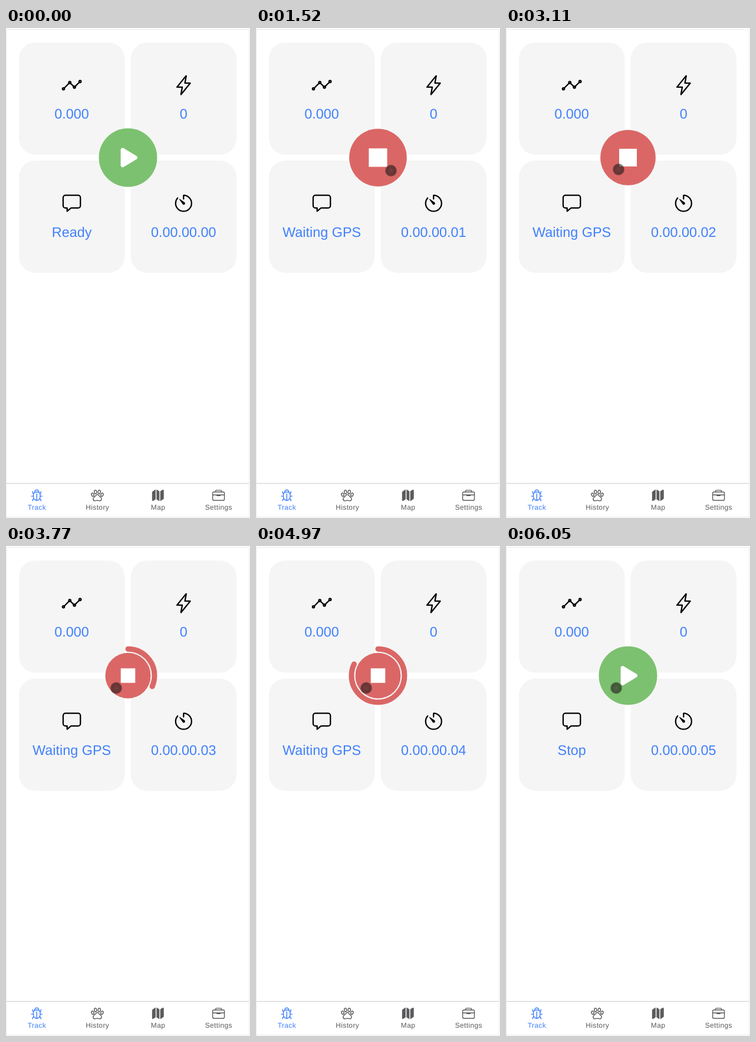
An HTML page that plays this animation: 414x828 px, repeating every 6080 ms.

```html
<!DOCTYPE html>
<html lang="en">
<head>
<meta charset="utf-8">
<title>Tracker</title>
<style>
  html, body { margin: 0; height: 100%; overflow: hidden; background: #fff; }
  svg { display: block; width: 414px; height: 828px; font-family: "Liberation Sans", Arial, sans-serif; text-anchor: middle; }
  text { text-rendering: geometricPrecision; }
  .card { fill: #f5f5f5; }
  .value { font-size: 23.4px; fill: #4080fc; }
  .line { fill: none; stroke: currentColor; stroke-width: 32; stroke-linecap: round; stroke-linejoin: round; }
  .solid { fill: currentColor; stroke: none; }
  .tab { font-size: 12px; letter-spacing: .36px; fill: currentColor; }
</style>
</head>
<body>
<svg viewBox="0 0 414 828">
  <path d="M.5 828V2.5H412.5V828M0 826.5H413" fill="none" stroke="#ece8ee"/>
  <g id="cards"></g>
  <path d="M1 769.5H412" stroke="#cdcdcd"/>
  <g id="tabs"></g>
  <g transform="translate(207 219)">
    <circle id="ring" r="45" pathLength="360" transform="rotate(-90)" fill="none" stroke="#da6766" stroke-width="9" stroke-linecap="round"/>
    <g id="button">
      <circle id="disc" r="49.5"/>
      <path id="play" fill="#fff" transform="translate(1.8 0) scale(.089) translate(-256 -256)" d="M133 440a35.37 35.37 0 01-17.5-4.67c-12-6.8-19.46-20-19.46-34.34V111c0-14.37 7.46-27.54 19.46-34.33a35.13 35.13 0 0135.77.45l247.85 148.36a36 36 0 010 61l-247.89 148.4A35.5 35.5 0 01133 440z"/>
      <path id="stop" fill="#fff" d="M-15.8-15.8h31.6v31.6h-31.6z"/>
    </g>
  </g>
  <radialGradient id="touchFill">
    <stop offset="0" stop-color="#201818" stop-opacity=".52"/>
    <stop offset=".75" stop-color="#201818" stop-opacity=".65"/>
    <stop offset="1" stop-color="#201818" stop-opacity=".4"/>
  </radialGradient>
  <circle id="touch" r="10" fill="url(#touchFill)"/>
</svg>
<script>
const $ = id => document.getElementById(id);
const line = d => `<path d="${d}"/>`;
const solid = d => `<path class="solid" d="${d}"/>`;
const dot = (x, y) => `<circle cx="${x}" cy="${y}" r="24"/>`;
const oval = (x, y, rx, ry, turn) =>
  `<ellipse rx="${rx}" ry="${ry}" transform="translate(${x} ${y}) rotate(${turn})"/>`;

const icons = {
  chart: dot(456, 168) + dot(320, 304) + dot(208, 192) + dot(56, 344) +
    line('M339 285l98-98M227 211l74 74M75 325l114-114'),
  flash: line('M315.27 33L96 304h128l-31.51 173.23a2.36 2.36 0 004.22 1.82L416 208H288l31.66-173.25a2.45 2.45 0 00-4.39-1.75z'),
  chat: line('M408 64H104a56.16 56.16 0 00-56 56v192a56.16 56.16 0 0056 56h40v80l93.72-78.14a8 8 0 015.13-1.86H408a56.16 56.16 0 0056-56V120a56.16 56.16 0 00-56-56z'),
  timer: line('M112.91 128A191.85 191.85 0 0064 254c-1.18 106.35 85.65 193.8 192 194 106.2.2 192-85.83 192-192 0-104.54-83.55-189.61-187.5-192a4.36 4.36 0 00-4.5 4.37V152') +
    solid('M233.38 278.63l-79-113a8.13 8.13 0 0111.32-11.32l113 79a32.5 32.5 0 01-37.25 53.26 33.21 33.21 0 01-8.07-7.94z'),
  bug: line('M370 378c28.89 23.52 46 46.07 46 86M142 378c-28.89 23.52-46 46.06-46 86M384 208c28.89-23.52 32-56.07 32-96M128 206c-28.89-23.52-32-54.06-32-94M464 288H384M128 288H48M256 192v256') +
    line('M256 448c-70.4 0-128-57.6-128-128v-96c0-65 57.6-96 128-96s128 25.6 128 96v96c0 70.4-57.6 128-128 128zM179 143.5a49 49 0 01-3-15.7a80 80 0 01160 0a42 42 0 01-3 14.3'),
  paw: oval(184, 128, 46, 68, -8) + oval(328, 128, 46, 68, 8) +
    oval(78, 232, 44, 64, -22) + oval(434, 232, 44, 64, 22) +
    line('M381 330c-16-10-31-19-40-35C315 249 299 224 256 224s-59 25-86 71c-9 16-24 25-40 35C110 342 96 351 96 392c0 36 24 72 64 72 26 0 64-16 96-16s68 16 96 16c36 0 64-36 64-72 0-41-14-50-35-62z'),
  map: solid('M48 113A32 32 0 0032 141V438a32 32 0 0048 28l84-55a8 8 0 004-7V46a8 8 0 00-13-6zM212 39A8 8 0 00200 46v358a8 8 0 004 6l96 63A8 8 0 00312 466V109a8 8 0 00-4-7zM464 46a32 32 0 00-32 0l-84 55a8 8 0 00-4 7v358a8 8 0 0013 6l107-73a32 32 0 0016-28V75a33 33 0 00-16-29z'),
  case: '<rect x="32" y="128" width="448" height="320" rx="48"/>' +
    line('M144 128V96a32 32 0 0132-32h160a32 32 0 0132 32v32M480 240H32M320 240v24a8 8 0 01-8 8H200a8 8 0 01-8-8v-24')
};
const icon = (name, x, y, scale) =>
  `<g class="line" transform="translate(${x} ${y}) scale(${scale}) translate(-256 -256)">${icons[name]}</g>`;

const cards = [['chart', 'distance', '0.000'], ['flash', 'speed', '0'], ['chat', 'status', ''], ['timer', 'clock', '']];
$('cards').innerHTML = cards.map(([name, id, text], i) => {
  const x = i % 2 ? 301.3 : 111.6, y = i > 1 ? 224 : 24.4;
  return `<rect class="card" x="${x - 89.7}" y="${y}" width="179.5" height="189.7" rx="28"/>` +
    icon(name, x, y + 72.2, .0705) + `<text class="value" id="${id}" x="${x}" y="${y + 128.6}">${text}</text>`;
}).join('');

const tabs = [['bug', 'Track'], ['paw', 'History'], ['map', 'Map'], ['case', 'Settings']];
$('tabs').innerHTML = tabs.map(([name, label], i) => {
  const x = 52.2 + i * 102.8;
  return `<g color="${i ? '#5c5c5e' : '#4080fc'}">${icon(name, x, 789.7, .0445)}<text class="tab" x="${x + .2}" y="813.8">${label}</text></g>`;
}).join('');

const LOOP = 6080, START = 620, END = 5960, DELAY = 140, HOLD = 2740, SQUEEZE = 150;
const presses = [[860, 1380], [1765, 2700], [3075, END]];
// Touch moves: from time, to time, from point, to point
const moves = [
  [70, 480, 290, 828, 229, 241],
  [1590, 1740, 229, 241, 202, 244],
  [2850, 3060, 202, 244, 191, 239],
  [3120, 3200, 191, 239, 187, 240]
];
const ramp = (t, from, length) => Math.min(1, Math.max(0, (t - from) / length));
const easeOut = x => 1 - (1 - x) ** 1.68;

function draw(t) {
  const running = t >= START && t < END;
  let squeeze = 0, sweep = 0;
  for (const [down, up] of running ? presses : []) {
    squeeze += ramp(t, down, SQUEEZE) - ramp(t, up, SQUEEZE);
    if (t < up) sweep += 360 * easeOut(ramp(t, down + DELAY, HOLD));
  }
  $('button').setAttribute('transform', `scale(${1 - .222 * squeeze})`);
  $('ring').setAttribute('stroke-dasharray', `${sweep} 400`);
  $('ring').style.display = sweep > 0 ? '' : 'none';
  $('disc').setAttribute('fill', running ? '#da6766' : '#7cc170');
  $('play').style.display = running ? 'none' : '';
  $('stop').style.display = running ? '' : 'none';

  $('status').textContent = t < START ? 'Ready' : running ? 'Waiting GPS' : 'Stop';
  const seconds = Math.min(5, Math.max(0, Math.floor((t - 400) / 1000)));
  $('clock').textContent = `0.00.00.0${seconds}`;

  const [from, to, x0, y0, x1, y1] = moves.findLast(m => t >= m[0]) || moves[0];
  const p = easeOut(ramp(t, from, to - from));
  $('touch').setAttribute('transform', `translate(${x0 + (x1 - x0) * p} ${y0 + (y1 - y0) * p})`);
  $('touch').style.display = t < moves[0][0] ? 'none' : '';
}

const begin = performance.now();
function tick() {
  draw((performance.now() - begin) % LOOP);
  requestAnimationFrame(tick);
}
tick();
</script>
</body>
</html>
```
